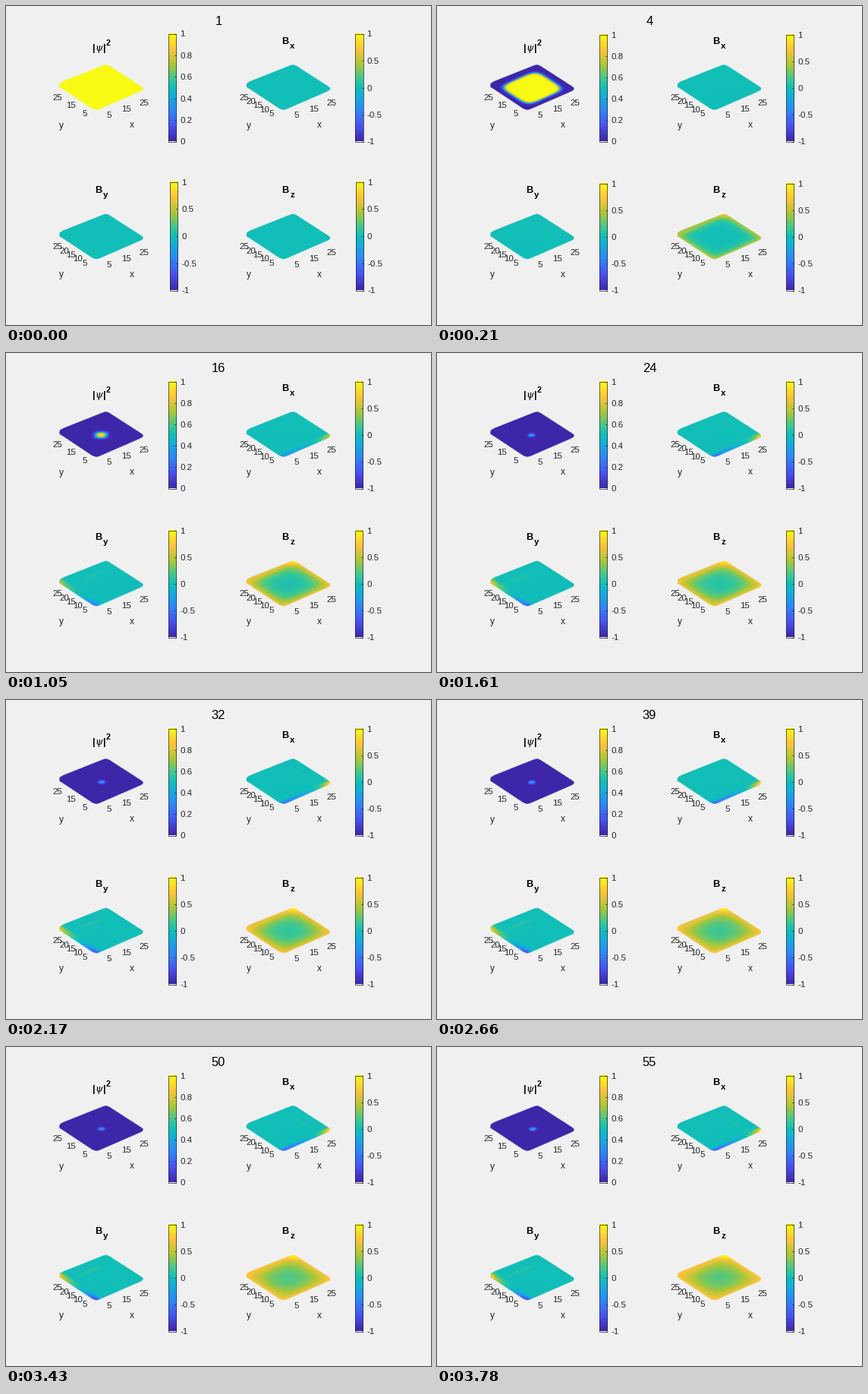
A matplotlib script that plays this animation: 560x420 px, repeating every 3.85 s.

```python
import numpy as np
import matplotlib.pyplot as plt
from matplotlib.animation import FuncAnimation
from matplotlib.colors import LinearSegmentedColormap
from matplotlib.patches import Circle, Polygon, Rectangle

W, H, DPI = 560, 420, 100
FRAMES, INTERVAL = 55, 70
BG, INK = "#f0f0f0", "#262626"

STOPS = [
    (0, (.2422, .1504, .6603)), (1 / 7, (.2810, .3228, .9579)),
    (2 / 7, (.1786, .5289, .9682)), (3 / 7, (.0689, .6948, .8394)),
    (.5, (.0704, .7457, .7258)), (4 / 7, (.2161, .7843, .5923)),
    (5 / 7, (.6720, .7793, .2227)), (6 / 7, (.9970, .7659, .2199)),
    (1, (.9769, .9839, .0805)),
]
PARULA = LinearSegmentedColormap.from_list("parula", STOPS, N=256)

# Slab outline and its in-plane axes, in pixels of the first panel
OUTLINE = np.array([
    (70, 104), (71, 101.5), (75, 99), (128, 78), (132, 77), (136, 78.5),
    (178, 105.5), (181, 108), (180, 111), (176, 113), (123, 136),
    (119, 137), (114, 135.5), (74, 109), (70.5, 107)])
ORIGIN = np.array([118.5, 137])
U_AXIS, V_AXIS = np.array([61, -27]), np.array([-47.5, -31])
BOX = (66, 73, 186, 141)

fig = plt.figure(figsize=(W / DPI, H / DPI), dpi=DPI, facecolor=BG)
ax = fig.add_axes([0, 0, 1, 1])
ax.axis("off")


def label(x, y, s, px=11.5, color=INK, ha="center", va="center_baseline", **kw):
    kw.setdefault("family", "Liberation Sans")
    return ax.text(x, y, s, fontsize=px * 72 / DPI, color=color,
                   ha=ha, va=va, **kw)


def slab_grid():
    x0, y0, x1, y1 = BOX
    px, py = np.meshgrid(np.arange(x0, x1) + .5, np.arange(y0, y1) + .5)
    inv = np.linalg.inv(np.column_stack([U_AXIS, V_AXIS]))
    dx, dy = px - ORIGIN[0], py - ORIGIN[1]
    u = inv[0, 0] * dx + inv[0, 1] * dy
    v = inv[1, 0] * dx + inv[1, 1] * dy
    return np.clip(u, 0, 1), np.clip(v, 0, 1)


U, V = slab_grid()


def core_size(n):
    return np.interp(n, [0, 1, 3, 7, 11, 15, 19, 23],
                     [.7, .46, .39, .305, .2, .095, .06, .045])


def psi2(n):
    if n == 0:
        return np.ones_like(U)
    size = core_size(n)
    p = np.interp(n, [7, 15, 23], [5, 1.6, 2])
    wob = .012 * np.clip((n - 15) / 8, 0, 1)
    du = np.abs(U - .5 - wob * np.sin(1.3 * n))
    dv = np.abs(V - .5 - wob * np.cos(1.7 * n))
    r = (du ** p + dv ** p) ** (1 / p)
    amp = np.interp(n, [0, 14, 18, 23], [1, 1, .7, .42])
    if n > 23:
        amp += .06 * np.sin((n - 23) * .42)
    edge = np.interp(n, [0, 15, 23], [.014, .022, .014])
    return amp / (1 + np.exp(np.clip((r - size) / edge, -50, 50)))


def side_amp(n):
    return np.interp(n, [0, 7, 15, 23, 38, 54], [0, .07, .5, .68, .8, .82])


def streak(a, b):
    return np.exp(-((a - .8) / .05) ** 2 - ((b - .5) / .25) ** 2)


def b_x(n):
    face = 1.1 * U ** 5 - .8 * (1 - U) ** 1.4
    return side_amp(n) * (face * np.exp(-(V / .08) ** 2) + .04 * streak(U, V))


def b_y(n):
    face = .9 * V ** 3 - (1 - V) ** 3
    return side_amp(n) * (face * np.exp(-(U / .08) ** 2) + .1 * streak(V, U))


def b_z(n):
    depth = np.interp(n, [0, 7, 15, 23, 38, 54], [.05, .1, .13, .15, .185, .21])
    edge = np.interp(n, [0, 7, 15, 54], [.5, .55, .58, .66])

    def wall(t):
        return np.exp(-t / depth) + np.exp(-(1 - t) / depth)

    cu, cv = np.clip(wall(U), 0, 1), np.clip(wall(V), 0, 1)
    field = edge * (1 - (1 - cu) * (1 - cv))
    field += .1 * np.exp(-((.5 - np.abs(U - .5)) + (.5 - np.abs(V - .5))) / .1)
    field += .22 * np.exp(-((1 - U) ** 2 + (1 - V) ** 2) / .018)
    return field * (1 - np.exp(-n / 2.2))


class Panel:
    def __init__(self, dx, dy, field, low, ticks, all_y, bars):
        self.field, self.low, self.ticks, self.bars = field, low, ticks, bars
        x0, y0, x1, y1 = BOX
        self.img = ax.imshow(field(0), cmap=PARULA, vmin=low, vmax=1,
                             extent=(x0 + dx, x1 + dx, y1 + dy, y0 + dy),
                             interpolation="nearest", aspect="auto", zorder=2)
        shape = Polygon(OUTLINE + (dx, dy), fc="none", ec=BG, lw=.8,
                        ls=(0, (1.2, 1.2)), alpha=.5, zorder=3)
        ax.add_patch(shape)
        self.img.set_clip_path(shape)

        step = 5 if all_y else 10
        for k in range(5, 26, step):
            f = (25 - k) / 20
            label(67.5 + 36 * f + dx, 120 + 21 * f + dy, str(k))
        for k in (5, 15, 25):
            f = (k - 5) / 20
            label(136 + 46 * f + dx, 143 - 16 * f + dy, str(k))
        label(73 + dx, 156 + dy, "y", 12)
        label(166 + dx, 156 + dy, "x", 12)

        ramp = np.linspace(1, 0, 256)[:, None]
        self.bar = ax.imshow(ramp, cmap=PARULA, extent=(0, 1, 1, 0),
                             aspect="auto", zorder=2)
        self.frame = ax.add_patch(Rectangle((0, 0), 1, 1, fc="none", ec=INK,
                                            lw=.5, zorder=3))
        self.marks = [ax.plot([], [], color=INK, lw=.5, zorder=4)[0]
                      for _ in ticks]
        self.names = [label(0, 0, f"{t:g}", ha="left") for t in ticks]

    def place_bar(self, first):
        x, top, bottom = self.bars[0 if first else 1]
        right = x + 10.5
        self.bar.set_extent((x, right, bottom, top))
        self.frame.set_bounds(x, top, right - x, bottom - top)
        for t, mark, name in zip(self.ticks, self.marks, self.names):
            y = bottom - (t - self.low) / (1 - self.low) * (bottom - top)
            mark.set_data([right - 1.8, right], [y, y])
            name.set_position((x + 15.5, y))

    def draw(self, n):
        self.img.set_data(self.field(n))
        self.place_bar(n == 0)


SYM = (-1, -.5, 0, .5, 1)
panels = [
    Panel(0, 0, psi2, 0, (0, .2, .4, .6, .8, 1), False,
          [(213.5, 36.5, 178.5), (213.5, 37.5, 178.5)]),
    Panel(246.5, 0, b_x, -1, SYM, True,
          [(460, 36.5, 178.5), (459.5, 37.5, 178.5)]),
    Panel(0, 196.5, b_y, -1, SYM, True,
          [(215.5, 231.5, 374.5), (213.5, 233.5, 374.5)]),
    Panel(246.5, 196.5, b_z, -1, SYM, True,
          [(460.5, 231.5, 374.5), (459.5, 233.5, 374.5)]),
]

bold = dict(color="black", weight="bold", va="baseline")
for x, y, sub in ((368, 50, "x"), (122, 246, "y"), (368, 246, "z")):
    label(x, y, "B", 12.8, **bold)
    label(x + 9, y + 6, sub, 11.5, **bold)
label(115.5, 58.5, "|", 13, **bold)
label(122.5, 58.5, "ψ", 12.5, family="DejaVu Serif", style="italic",
      color="black", va="baseline")
label(129.5, 58.5, "|", 13, **bold)
label(135, 52, "2", 10.8, **bold)
counter = label(280, 25, "1", 16.5, color="black", va="baseline")

nub = ax.add_patch(Circle((0, 0), 3.6, fc=(.8, .6, .4), ec="none",
                          alpha=.75, zorder=3))

ax.set_xlim(0, W)
ax.set_ylim(H, 0)


def update(n):
    for p in panels:
        p.draw(n)
    counter.set_text(str(n + 1))
    corner = ORIGIN + (.5 + .9 * core_size(n)) * (U_AXIS + V_AXIS)
    nub.center = tuple(corner + (0, 1))
    nub.set_visible(5 <= n <= 9)
    return []


anim = FuncAnimation(fig, update, frames=FRAMES, interval=INTERVAL,
                     repeat=True, repeat_delay=0, blit=False)
plt.show()
```
